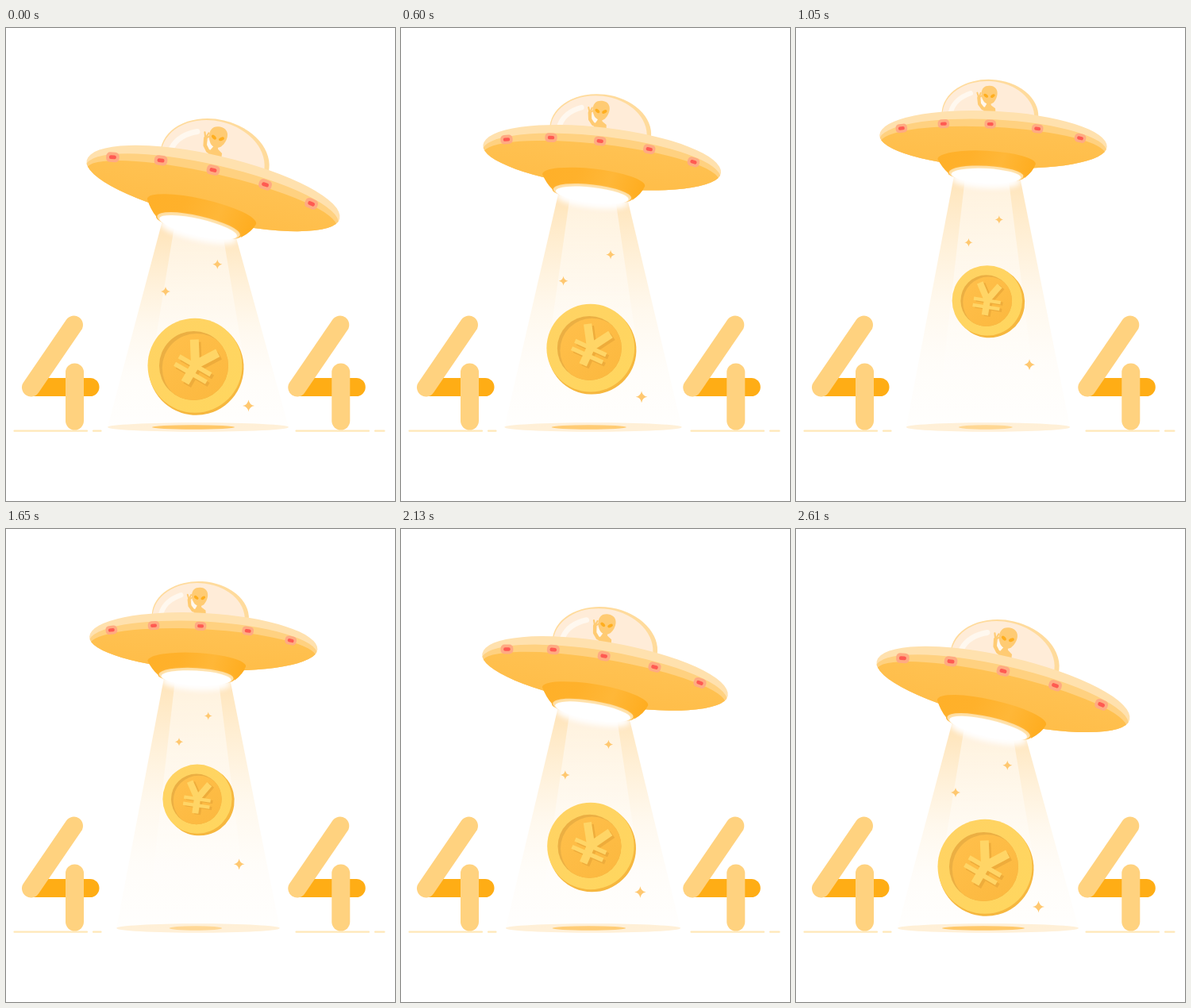
Write an HTML page with a canvas that moves like this. It is 490x596 px and loops after 2700 ms.

```html
<!DOCTYPE html>
<html lang="en">
<head>
<meta charset="utf-8">
<title>404</title>
<style>
  html, body { margin: 0; width: 100%; height: 100%; overflow: hidden; background: #fff; }
  canvas { display: block; width: 490px; height: 596px; }
</style>
</head>
<body>
<canvas id="stage" width="490" height="596"></canvas>
<script>
const ctx = document.getElementById('stage').getContext('2d');
const LOOP = 2700, STEP = 30, TURN = 1500;
const RAD = Math.PI / 180;

// [start, end, ease-out handle, ease-in handle] for the way up and the way down
const MOTION = {
  ship:  { up: [0, 1140, 0.488, 0.42],  down: [1500, 2640, 0.488, 0.42] },
  coin:  { up: [90, 1270, 0.66, 0.47],  down: [1500, 2610, 0.66, 0.32] },
  late:  { up: [210, 1320, 0.55, 0.53], down: [1500, 2610, 0.56, 0.51] },
  spark: { up: [90, 1290, 0.735, 0.44], down: [1500, 2610, 0.5, 0.46] }
};

const lerp = (a, b, p) => a + (b - a) * p;

function ease(t, [start, end, x1, x2]) {
  const x = (t - start) / (end - start);
  if (x <= 0) return 0;
  if (x >= 1) return 1;
  let lo = 0, hi = 1, s = 0.5;
  for (let i = 0; i < 24; i++) {
    s = (lo + hi) / 2;
    const r = 1 - s;
    if (3 * r * r * s * x1 + 3 * r * s * s * x2 + s * s * s < x) lo = s; else hi = s;
  }
  return s * s * (3 - 2 * s);
}

const lift = (t, { up, down }) => t < TURN ? ease(t, up) : 1 - ease(t, down);

function ellipse(x, y, rx, ry, fill) {
  ctx.fillStyle = fill;
  ctx.beginPath();
  ctx.ellipse(x, y, rx, ry, 0, 0, Math.PI * 2);
  ctx.fill();
}

function line(color, width, ...pts) {
  ctx.strokeStyle = color;
  ctx.lineWidth = width;
  ctx.beginPath();
  for (let i = 0; i < pts.length; i += 2) ctx.lineTo(pts[i], pts[i + 1]);
  ctx.stroke();
}

function poly(fill, pts) {
  ctx.fillStyle = fill;
  ctx.beginPath();
  pts.forEach(([x, y]) => ctx.lineTo(x, y));
  ctx.closePath();
  ctx.fill();
}

function gradient(x0, y0, x1, y1, ...stops) {
  const g = ctx.createLinearGradient(x0, y0, x1, y1);
  stops.forEach((c, i) => g.addColorStop(i / (stops.length - 1), c));
  return g;
}

function pill(w, h, r, fill) {
  ctx.fillStyle = fill;
  ctx.beginPath();
  ctx.roundRect(-w / 2, -h / 2, w, h, r);
  ctx.fill();
}

function ground() {
  ctx.lineCap = 'round';
  for (const x of [0, 355]) {
    line('#ffe8b8', 2.2, x + 10.5, 507.7, x + 102, 507.7);
    line('#ffe8b8', 2.2, x + 110, 507.7, x + (x ? 121.5 : 119.5), 507.7);
  }
}

function four(x) {
  ctx.save();
  ctx.translate(x, 0);
  ctx.lineCap = 'round';
  line('#ffad15', 23, 34, 452.5, 106, 452.5);
  line('#ffd27f', 23, 85.5, 374, 31.5, 453);
  line('#ffd27f', 23, 86.5, 434, 86.5, 495);
  ctx.restore();
}

// Ship frame: origin at the middle lamp, x along the tilted hull
function shipPose(p) {
  return {
    x: lerp(261, 244.6, p), y: lerp(179, 120.7, p),
    angle: lerp(13, 2.9, p) * RAD, scale: lerp(1, 0.8765, p)
  };
}

function fromShip({ x, y, angle, scale }, u, v) {
  const c = Math.cos(angle) * scale, s = Math.sin(angle) * scale;
  return [x + u * c - v * s, y + u * s + v * c];
}

function beam(pose, p, pc) {
  const cx = 242, rx = lerp(114, 102.5, p), base = 503;
  const at = (u, v) => fromShip(pose, u, v);
  const top = at(0, 70)[1];

  ellipse(cx, base, rx, 5.8, '#fff0d8');
  ctx.globalAlpha = lerp(1, 0.58, pc);
  ellipse(lerp(236, 239, pc), base, lerp(52, 33, pc), 2.7, '#ffc767');
  ctx.globalAlpha = 1;

  poly(gradient(0, top, 0, base,
    'rgba(255,211,140,.62)', 'rgba(255,215,150,.4)', 'rgba(255,221,165,.2)',
    'rgba(255,226,180,.08)', 'rgba(255,230,190,.03)'),
    [at(-48, 76), at(47, 76), [cx + rx, base], [cx - rx, base]]);
  poly(gradient(0, top, 0, base,
    'rgba(255,255,255,.52)', 'rgba(255,255,255,.42)', 'rgba(255,255,255,.2)', 'rgba(255,255,255,0)'),
    [at(-32, 76), at(30, 76), [cx + rx * 0.63, base], [cx - rx * 0.63, base]]);
}

function sparkle(x, y, r) {
  const k = r * 0.2;
  ctx.fillStyle = '#ffc870';
  ctx.beginPath();
  ctx.moveTo(x, y - r);
  for (let i = 0; i < 4; i++) {
    const a = (i * 90 - 45) * RAD, b = i * 90 * RAD;
    ctx.quadraticCurveTo(x + k * Math.cos(a), y + k * Math.sin(a), x + r * Math.cos(b), y + r * Math.sin(b));
  }
  ctx.fill();
}

function yen(color) {
  ctx.lineCap = 'butt';
  ctx.lineJoin = 'miter';
  line(color, 11, -17, -27, 0, 0, 17, -27);
  line(color, 11, 0, -5, 0, 26);
  line(color, 5.8, -23, 1, 23, 1);
  line(color, 5.8, -23, 12, 23, 12);
}

function coin(p) {
  ctx.save();
  ctx.translate(lerp(238, 241, p), lerp(425.2, 338.7, p));
  ctx.scale(lerp(1, 0.728, p), lerp(1, 0.728, p));
  const angle = lerp(30, 8, p) * RAD;

  ctx.save();
  ctx.rotate(angle);
  const depth = lerp(3, 5, p);
  ellipse(depth * 0.85, depth * 0.5, 60, 60, '#f6b73f');
  ctx.restore();

  ellipse(0, 0, 59.5, 59.5, gradient(-40, -45, 40, 45, '#ffd363', '#ffd65f'));
  ctx.save();
  ctx.translate(-1.5, 0.3);
  ellipse(0, 0, 43.5, 43.5, '#ebaf43');
  ctx.clip();
  ellipse(3.8, 3, 43.5, 43.5, gradient(-30, -35, 30, 35, '#ffbf4a', '#fcb940'));
  ctx.restore();

  ctx.rotate(angle);
  ctx.translate(0, -1);
  ctx.save();
  ctx.translate(4, 1.5);
  yen('#eeac3b');
  ctx.restore();
  yen('#ffd566');
  ctx.restore();
}

function alien() {
  const skin = '#ffcb73';
  ellipse(-11, -31, 4.5, 7, '#fff8ee');
  ctx.lineCap = ctx.lineJoin = 'round';
  line(skin, 4.6, -18.5, -37, -17, -28, -12, -22, -4, -20);
  line(skin, 2.2, -21, -44, -18.5, -37, -16, -44);
  line(skin, 2.2, -18.5, -37, -14.5, -40);
  poly(skin, [[-6, -30], [-1, -30], [0, -27], [6, -23], [7, -14], [-12, -14], [-9, -24]]);

  ctx.fillStyle = skin;
  ctx.beginPath();
  ctx.moveTo(-3.5, -55);
  ctx.bezierCurveTo(11, -55, 10, -39, 3, -31);
  ctx.quadraticCurveTo(-3.5, -25.5, -10, -31);
  ctx.bezierCurveTo(-17, -39, -18, -55, -3.5, -55);
  ctx.fill();

  ctx.fillStyle = '#ffae1e';
  for (const side of [-1, 1]) {
    ctx.beginPath();
    ctx.ellipse(-3.5 + side * 4.9, -40.5, 3.6, 2.1, -side * 35 * RAD, 0, Math.PI * 2);
    ctx.fill();
  }
}

function dome() {
  ellipse(-1, -13, 69.5, 51, '#ffdb9c');
  ellipse(-3.3, -11.5, 66, 50, '#ffecd8');
  ctx.lineCap = 'round';
  ctx.strokeStyle = '#fff8ef';
  ctx.lineWidth = 7;
  ctx.beginPath();
  ctx.ellipse(-3, -9, 55, 39, 0, 190 * RAD, 240 * RAD);
  ctx.stroke();
  alien();
}

// Fills everything below the upper half of an ellipse
function below(v, rx, ry, fill) {
  ctx.fillStyle = fill;
  ctx.beginPath();
  ctx.ellipse(5.5, v, rx, ry, 0, Math.PI, Math.PI * 2);
  ctx.lineTo(5.5 + rx, 90);
  ctx.lineTo(5.5 - rx, 90);
  ctx.fill();
}

function hull() {
  ctx.save();
  ctx.beginPath();
  ctx.ellipse(5.5, 24, 163.5, 43, 0, Math.PI, Math.PI * 2);
  ctx.ellipse(5.5, 24, 163.5, 38.5, 0, 0, Math.PI);
  ctx.fillStyle = '#ffe1ae';
  ctx.fill();
  ctx.clip();
  below(31, 163.5, 38, '#ffd180');
  below(35, 162, 31, gradient(0, 0, 0, 64, '#ffc253', '#ffbd48'));
  ctx.restore();

  for (const u of [-127, -67, 0, 68, 130]) {
    ctx.save();
    ctx.translate(u, 34 - 34 * Math.sqrt(1 - (u / 163) ** 2));
    ctx.rotate(u / 130 * 10 * RAD);
    pill(16.5, 12.5, 5, '#ffab82');
    pill(9, 4.8, 2.2, '#ff5a52');
    ctx.restore();
  }
}

function collar() {
  ctx.fillStyle = gradient(-70, 40, 60, 75, '#ffb029', '#ffb12b', '#ffb738', '#ffad20');
  ctx.beginPath();
  ctx.ellipse(-2.5, 54, 70.5, 15.5, 0, Math.PI, Math.PI * 2);
  ctx.quadraticCurveTo(65, 65, 53, 75);
  ctx.ellipse(-2, 73, 55, 11, 0, 0, Math.PI);
  ctx.quadraticCurveTo(-66, 66, -73, 54);
  ctx.fill();

  ellipse(-2.2, 72.2, 53.5, 12, '#ffdc9a');
  ctx.save();
  ctx.shadowColor = '#fff';
  ctx.shadowBlur = 9;
  ctx.shadowOffsetY = 4;
  ellipse(-2.2, 74.5, 50, 10.5, '#fff');
  ellipse(-2.2, 75, 47, 10, '#fff');
  ctx.restore();
}

function ship({ x, y, angle, scale }) {
  ctx.save();
  ctx.translate(x, y);
  ctx.rotate(angle);
  ctx.scale(scale, scale);
  dome();
  hull();
  collar();
  ctx.restore();
}

function draw(t) {
  const p = lift(t, MOTION.ship), pc = lift(t, MOTION.coin);
  const pl = lift(t, MOTION.late), ps = lift(t, MOTION.spark);
  const pose = shipPose(p);

  ctx.fillStyle = '#fff';
  ctx.fillRect(0, 0, 490, 596);
  ground();
  four(0);
  four(335.3);
  beam(pose, ps, pc);
  coin(pc);
  sparkle(lerp(266.3, 254.5, pl), lerp(297.7, 234, pl), lerp(6, 5, pl));
  sparkle(lerp(201, 218.5, ps), lerp(332, 266.3, ps), lerp(6, 5.2, ps));
  sparkle(lerp(305.5, 293.3, ps), lerp(476, 420.8, ps), lerp(7.5, 6.8, ps));
  ship(pose);
}

function tick() {
  const t = performance.now() % LOOP;
  draw(Math.floor(t / STEP) * STEP);
  requestAnimationFrame(tick);
}
tick();
</script>
</body>
</html>
```
